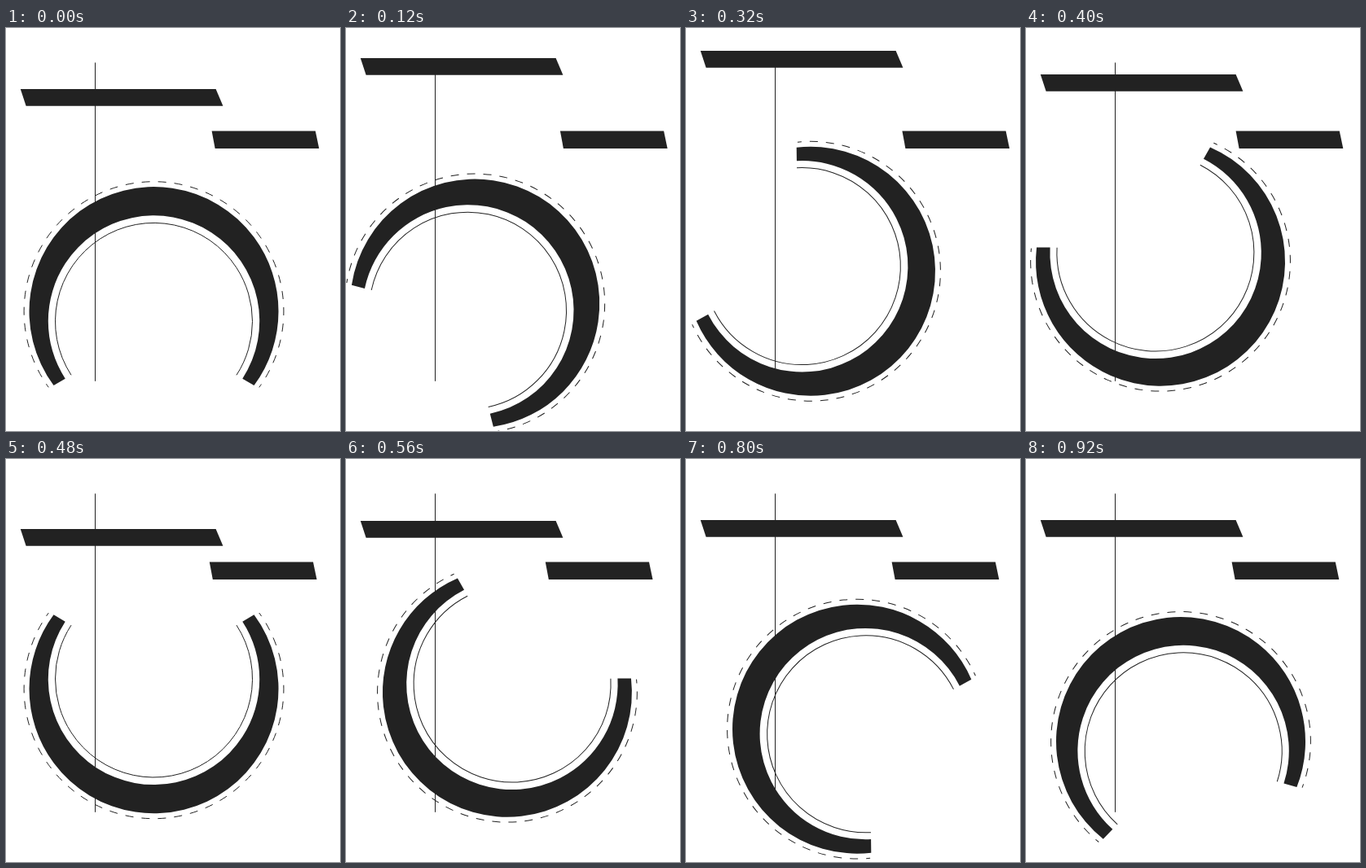
An HTML page with a canvas that plays this animation: 410 by 495 pixels, repeating every 0.96 s.

```html
<!DOCTYPE html>
<html lang="en">
<head>
<meta charset="utf-8">
<title>Rolling arc</title>
<style>
  html, body { margin: 0; width: 100%; height: 100%; overflow: hidden; background: #fff; }
  canvas { display: block; }
</style>
</head>
<body>
<canvas id="stage" width="410" height="495"></canvas>
<script>
const ctx = document.getElementById('stage').getContext('2d');
const LOOP = 960;
const STEP = 40;
const INK = '#222';
const rad = deg => deg * Math.PI / 180;
const lerp = (a, b, k) => a + (b - a) * k;

const PIVOT = { x: 181.5, y: 315.2 };

// Arcs hang below the pivot; gap is half the opening, in degrees, around the bottom.
const outer = { drop: 32.9, r: 153, gap: 53.5 };
const inner = { drop: 44.8, r: 129.7, gap: 57 };
const thin = { drop: 45.2, r: 121, gap: 57 };
const dashed = { drop: 32.9, r: 159.4, gap: 54.2 };
const DASH_PERIODS = 35;

// One long swing out and back, then a short rebound.
function swing(t, rest, peak, back, rebound) {
  if (t < 240) return lerp(rest, peak, t / 240);
  if (t < 480) return lerp(peak, back, (t - 240) / 240);
  if (t < 640) return lerp(back, rebound, (t - 480) / 160);
  return lerp(rebound, rest, Math.min(1, (t - 640) / 160));
}

function slab(x, y, width, height, leftSlant, rightSlant) {
  ctx.beginPath();
  ctx.moveTo(x, y);
  ctx.lineTo(x + width, y);
  ctx.lineTo(x + width + rightSlant, y + height);
  ctx.lineTo(x + leftSlant, y + height);
  ctx.fill();
}

function addArc({ drop, r, gap }, reverse = false) {
  const from = rad(90 + gap), to = rad(450 - gap);
  ctx.arc(0, drop, r, reverse ? to : from, reverse ? from : to, reverse);
}

function strokeArc(arc) {
  ctx.beginPath();
  addArc(arc);
  ctx.stroke();
}

function drawRing(t) {
  ctx.save();
  ctx.translate(PIVOT.x, PIVOT.y);
  ctx.rotate(2 * Math.PI * t / LOOP);

  ctx.beginPath();
  addArc(outer);
  addArc(inner, true);
  ctx.fill();

  strokeArc(thin);

  // Half a dash at both ends of the arc.
  const period = rad(360 - 2 * dashed.gap) * dashed.r / DASH_PERIODS;
  ctx.setLineDash([period / 2, period / 2]);
  ctx.lineDashOffset = period / 4;
  strokeArc(dashed);
  ctx.restore();
}

function draw(t) {
  ctx.fillStyle = '#fff';
  ctx.fillRect(0, 0, 410, 495);
  ctx.fillStyle = ctx.strokeStyle = INK;

  ctx.fillRect(109, 42.5, 1, 391.3);
  slab(17.8, Math.floor(swing(t, 75, 0, 86, 67)), 239.8, 20.8, 6.8, 8.8);
  slab(swing(t, 252.6, 273.2, 249.8, 239.8), 126.4, 127.2, 21.6, 4, 4.5);
  drawRing(t);
}

function tick() {
  const t = performance.now() % LOOP;
  draw(Math.floor(t / STEP) * STEP);
  requestAnimationFrame(tick);
}
tick();
</script>
</body>
</html>
```
